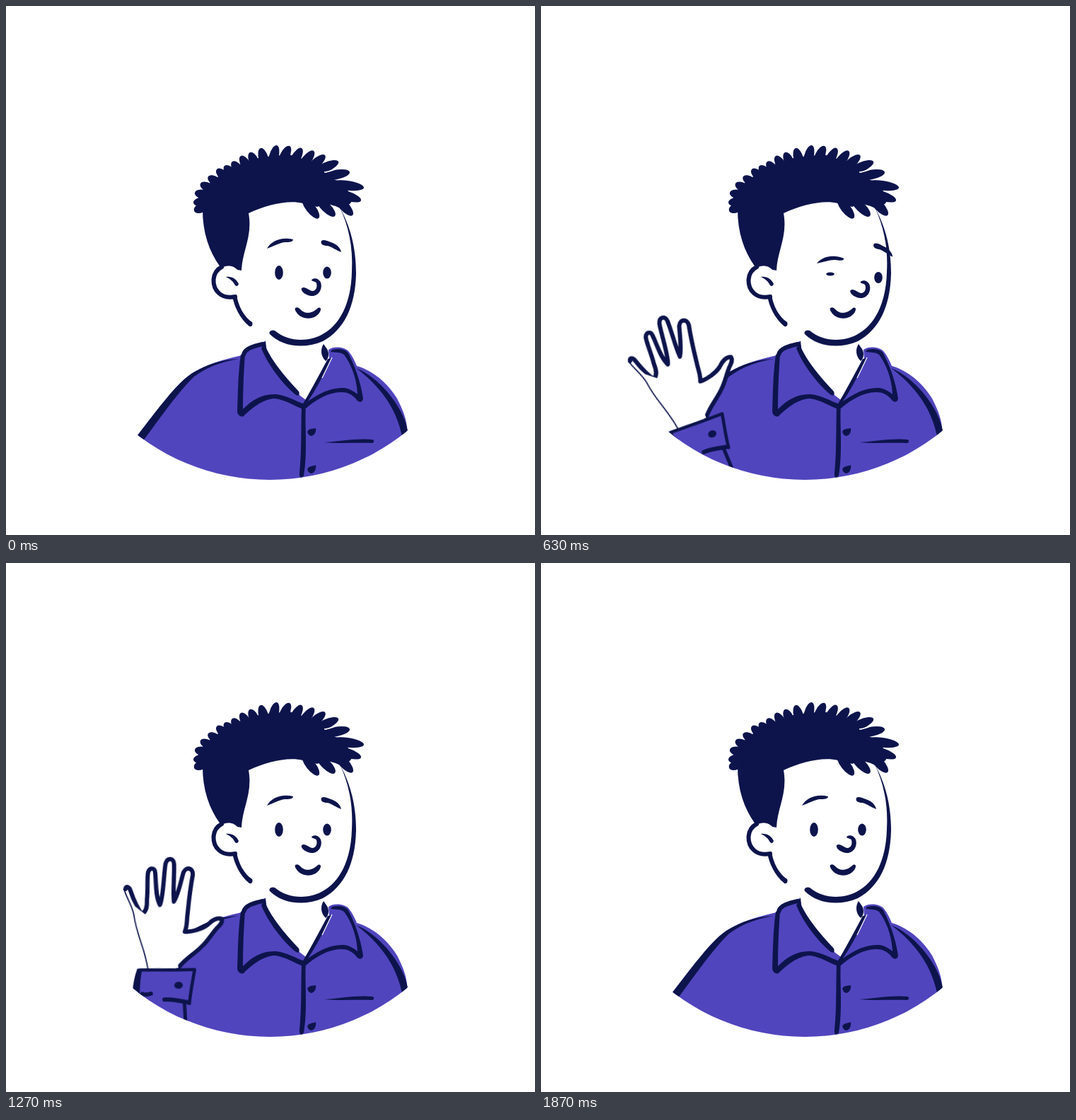
An HTML page that plays this animation: 748x748 px, repeating every 2000 ms.

```html
<!DOCTYPE html>
<html lang="en">
<head>
<meta charset="utf-8">
<title>Waving man</title>
<style>
  @property --turn { syntax: '<number>'; inherits: true; initial-value: 0; }
  html, body { margin: 0; width: 100%; height: 100%; overflow: hidden; background: #fff; }
  svg { display: block; width: 100vw; height: 100vh; --ink: #0d144c; --shirt: #5145be; }
  .ink { fill: var(--ink); }
  .shirt { fill: var(--shirt); }
  .line { fill: none; stroke: var(--ink); stroke-width: 6; stroke-linecap: round; stroke-linejoin: round; }
  .white { fill: #fff; }

  /* --turn runs from 0 (looking ahead) to 1 (head turned, winking) */
  .face { animation: turn 2s infinite; }
  .face > * { transform-origin: var(--o); }
  .brow-l { --o: 388px 337px; transform: translate(calc(var(--turn) * 21.5px), calc(var(--turn) * 24px)) rotate(calc(var(--turn) * 9deg)); }
  .brow-r { --o: 460px 340px; transform: translate(calc(var(--turn) * 24px), calc(var(--turn) * 5.5px)) rotate(calc(var(--turn) * 5deg)); }
  .eye-l { --o: 386px 377px; transform: translate(calc(var(--turn) * 23px), calc(var(--turn) * 2px)) scaleY(calc(1 - var(--turn) * .74)); }
  .eye-r { --o: 454px 377px; transform: translate(calc(var(--turn) * 23px), calc(var(--turn) * 7px)) scaleY(calc(1 - var(--turn) * .06)); }
  .nose { transform: translate(calc(var(--turn) * 19.5px), calc(var(--turn) * 3px)); }
  @keyframes turn {
    0%, 10% { --turn: 0; animation-timing-function: ease-in-out; }
    26% { --turn: 1; animation-timing-function: linear; }
    36% { --turn: 1; animation-timing-function: ease-in-out; }
    49.5%, 100% { --turn: 0; }
  }

  .arm { transform-origin: 263px 605px; animation: wave 2s infinite; }
  @keyframes wave {
    0%, 18% { transform: translate(0, 115px) rotate(-95deg); animation-timing-function: cubic-bezier(.3, .4, .65, .85); }
    31.5% { transform: translate(0, 0) rotate(-21.6deg); animation-timing-function: cubic-bezier(.3, .4, .65, .8); }
    36.5% { transform: translate(1px, -2px) rotate(-10.5deg); animation-timing-function: ease-out; }
    40% { transform: translate(2px, -3px) rotate(-6.6deg); animation-timing-function: ease-in-out; }
    56.5% { transform: translate(0, 0) rotate(.6deg); animation-timing-function: ease-in-out; }
    73.5% { transform: translate(2px, -3px) rotate(-6.6deg); animation-timing-function: cubic-bezier(.5, 0, .8, .6); }
    93%, 100% { transform: translate(0, 120px) rotate(-100deg); }
  }
</style>
</head>
<body>
<svg viewBox="0 0 748 748">
  <clipPath id="disc"><circle cx="373" cy="362" r="308"/></clipPath>
  <g clip-path="url(#disc)">

    <!-- shirt -->
    <path class="shirt" d="M186 607C215 570 240 535 262 520C285 506 310 499 333 494C335 486 350 480 366 474L370 491C383 514 400 534 416 551L424 557L457 499L456 486C464 480 480 482 485 489C490 495 493 502 496 509C518 515 540 533 553 555C563 575 568 588 567 605L560 690H190Z"/>
    <path class="ink" d="M186 607C215 570 240 535 262 520C285 506 305 500 329 499C305 503 285 510 266 524C243 546 220 580 196 612L191 616Z"/>
    <path class="ink" d="M495 512C530 526 563 570 568 600L560 608C553 575 535 542 495 512Z"/>
    <path class="ink" d="M367 473L368 484C380 508 398 528 414 545C416 550 413 552 410 550C392 536 370 507 361 484Z"/>
    <path class="line" stroke-width="5" d="M363 478C350 481 338 484 336 493"/>
    <path class="ink" d="M332 493L338 492C336 520 335 545 335 570C348 557 362 548 382 549C398 551 410 559 422 563L420 570C408 566 396 557 380 555C362 556 346 570 336 580C332 582 327 578 327 573C328 545 328 520 332 493Z"/>
    <path class="ink" d="M455 499L460 498C450 520 439 541 427 559C442 548 460 539 478 540C486 541 492 545 497 549C496 528 489 508 478 493C472 489 466 490 459 489L461 486C470 484 480 485 484 491C495 512 502 535 505 555C504 561 499 561 496 557C490 549 482 546 474 546C456 546 438 557 424 569L419 564C431 544 443 521 455 499Z"/>
    <path d="M461 497L447 526" stroke="#fff" stroke-width="1.2"/>
    <path class="ink" d="M449 478C445 484 444 494 452 502C456 499 457 492 455 487C453 483 451 481 449 478Z"/>
    <path class="ink" d="M418 565H424C422 590 427 630 421 664C419 668 414 668 415 660C418 630 417 600 418 565Z"/>
    <path class="ink" d="M426 602C428 597 434 598 438 597C439 602 436 608 431 608C428 607 427 605 426 602ZM426 655C428 650 434 651 438 649C439 655 436 661 431 661C428 660 427 658 426 655Z"/>
    <path class="ink" d="M450 617C475 615 495 611 518 613C522 615 520 618 517 618C495 617 475 619 450 617Z"/>

    <!-- head -->
    <path class="ink" d="M472 285C486 310 495 340 495 378C494 425 478 458 448 474C420 486 390 481 373 464C371 461 375 457 380 459C398 474 425 476 446 465C472 452 488 420 489 376C491 340 484 310 472 285Z"/>
    <path class="ink" d="M320 409L326 408C328 424 337 440 348 447C350 452 346 455 343 452C332 443 322 425 320 409Z"/>
    <path class="ink" d="M278 288C278 320 287 347 303 369L333 374C334 346 349 326 343 293C370 281 398 274 420 279L440 284L452 279L466 283L477 288L488 278L482 255L462 244L450 234L438 222L400 210L360 214L320 228L290 248L276 270Z"/>
    <g id="spikes" class="ink"></g>
    <path d="M450 235Q460 234 469 229" stroke="#fff" stroke-width="1.5" fill="none"/>
    <path class="white" d="M328 374C318 362 300 368 296 382C292 398 303 412 324 410L332 390Z"/>
    <path class="line" d="M305 369C297 373 294 380 293.500 387C293 402 304 415 324 411"/>
    <path class="ink" d="M311 383C319 382 326 386 329 393C328 396 326 397 324 395C321 389 317 386 311 383Z"/>
    <path class="ink" d="M409 427C414 424 416 430 420 432C427 436 435 433 441 427C446 425 446 430 443 434C436 444 420 444 412 435C409 431 408 429 409 427Z"/>

    <g class="face ink">
      <path class="brow-l" d="M369 343C375 332 390 326 406 330C406 334 400 334 394 334C386 335 378 340 369 343Z"/>
      <path class="brow-r" d="M446 332C450 329 456 333 462 335C469 338 473 343 474 348C468 346 460 340 454 339C449 339 444 337 446 332Z"/>
      <ellipse class="eye-l" cx="386" cy="377" rx="5.800" ry="10"/>
      <ellipse class="eye-r" cx="454" cy="377" rx="5.800" ry="8.600"/>
      <path class="nose" d="M418 399C422 396 426 400 430 402C436 405 441 400 439 392C438 389 434 390 432 388C433 384 442 384 445 391C448 400 442 410 433 410C426 410 416 404 418 399Z"/>
    </g>

    <!-- waving arm -->
    <g class="arm">
      <path class="white" d="M201 575L246 575L250 500L176 462L183 497Z"/>
      <path class="line white" style="fill:#fff" d="M173 459C174 453 179 457 180 461C184 474 188 486 195 495C202 492 203 484 203 475C205 460 204 445 206 436C209 429 216 430 216 438C217 452 215 470 221 483C226 475 228 440 231 425C234 416 243 417 243 426C243 445 240 462 241 479C248 468 252 450 256 438C260 430 270 432 269 442C265 460 262 480 260 495C258 506 259 514 255 522C265 523 280 519 288 513C294 507 302 503 308 506C309 512 304 515 300 519C292 528 286 537 279 543C268 554 254 560 244 573"/>
      <path class="white" d="M201 575L244 573L240 500L205 500L186 484L175 463L183 497C186 520 198 545 201 575Z"/>
      <path class="line" style="stroke-width:1.7" d="M171 459C175 473 182 483 184 497C186 522 198 545 201 573"/>
      <path class="shirt" d="M188 574L267 576L258 624L250 740H120L182 604Z"/>
      <path class="line" style="stroke-width:4.500" d="M189 574C215 575 240 576 267 576C264 592 260 607 258 624"/>
      <path class="ink" d="M186 572L193 573C190 585 189 596 188 612L178 606C179 594 182 582 186 572Z"/>
      <path class="line" d="M223 617C234 616 245 620 256 622M192 608Q198 610 204 608"/>
      <path class="line" style="stroke-width:5" d="M251 624C252 650 252 670 250 700"/>
      <ellipse class="ink" cx="243.500" cy="597.500" rx="6" ry="5"/>
    </g>
  </g>
</svg>
<script>
  // Hair spikes: tip x, tip y, direction in degrees, length
  const spikes = [
    [266, 290, 155, 22], [265, 278, 175, 26], [267, 264, 192, 26], [275, 251, 208, 26],
    [286, 241, 215, 26], [298, 231, 222, 26], [309, 226, 228, 26], [320, 220, 235, 26],
    [332, 212, 240, 28], [345, 207, 246, 28], [360, 201, 254, 30], [383, 197, 285, 34],
    [401, 198, 296, 32], [418, 201, 300, 34], [435, 205, 308, 34], [451, 211, 318, 36],
    [470, 220, 336, 40], [486, 235, 350, 40], [506, 257, 8, 48], [502, 275, 18, 44],
    [490, 296, 48, 36], [442, 300, 52, 36], [465, 297, 45, 36]
  ];
  const group = document.getElementById('spikes');
  for (const [x, y, angle, length] of spikes) {
    const spike = document.createElementNS('http://www.w3.org/2000/svg', 'ellipse');
    spike.setAttribute('cx', -length / 2);
    spike.setAttribute('rx', length / 2);
    spike.setAttribute('ry', 6.8);
    spike.setAttribute('transform', `translate(${x} ${y}) rotate(${angle})`);
    group.append(spike);
  }
</script>
</body>
</html>
```
